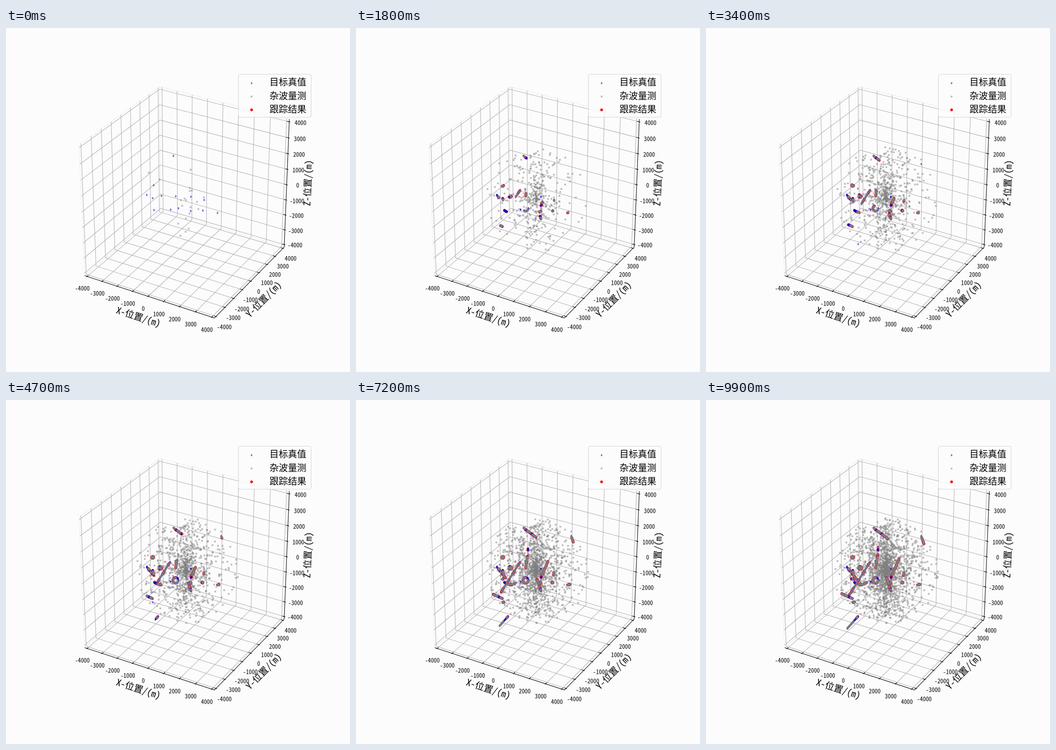
An HTML page with a canvas for the animation above (10 s loop, 748x748 px).

```html
<!DOCTYPE html>
<html lang="zh">
<head>
<meta charset="utf-8">
<style>
html, body { margin: 0; width: 100%; height: 100%; overflow: hidden; background: #fcfcfc; }
canvas { display: block; width: 748px; height: 748px; }
</style>
</head>
<body>
<canvas id="stage" width="748" height="748"></canvas>
<script>
const ctx = document.getElementById('stage').getContext('2d');
const STEPS = 100, STEP_MS = 100, LAST_MOVE = 83;
const CJK = '"Noto Sans Mono CJK SC", "Noto Sans CJK SC", "Noto Sans CJK", sans-serif';
const GREY = 'rgba(128,128,128,.5)', BLUE = 'rgba(20,10,215,.6)', RED = 'rgba(255,0,0,.6)';

// Perspective camera: elevation 30, azimuth -60, distance 10, unit cube
function project(x, y, z) {
  x /= 8000; y /= 8000; z /= 8000;
  const u = .8660 * x + .5 * y;
  const v = -.25 * x + .4330 * y + .8660 * z;
  const d = 10 - (.4330 * x - .75 * y + .5 * z);
  return [391.4 + 3128 * u / d, 370 - 3114 * v / d];
}

function makeRng(seed) {
  return () => {
    seed = (seed + 0x6D2B79F5) | 0;
    let t = Math.imul(seed ^ (seed >>> 15), 1 | seed);
    t = (t + Math.imul(t ^ (t >>> 7), 61 | t)) ^ t;
    return ((t ^ (t >>> 14)) >>> 0) / 4294967296;
  };
}
const rng = makeRng(41);

// Clutter: each scan adds points uniform in range, azimuth and elevation
function randomScan() {
  return Array.from({ length: 20 }, () => {
    const r = 3000 * rng(), az = 2 * Math.PI * rng(), el = Math.PI * (rng() - .5);
    return project(r * Math.cos(el) * Math.cos(az), r * Math.cos(el) * Math.sin(az), r * Math.sin(el));
  });
}
const clutter = Array.from({ length: STEPS }, randomScan);

// A target flying straight, with an optional downward sag
function fly(birth, x, y, dx, dy, sag = 0) {
  return k => {
    const f = (k - birth) / (LAST_MOVE - birth);
    return f < 0 || f > 1 ? null : [x + dx * f, y + dy * f + 4 * sag * f * (1 - f)];
  };
}
// A target circling in place; with no radius it is seen only briefly
function circle(birth, x, y, r = 0) {
  const end = r ? LAST_MOVE : birth + 1;
  return k => {
    const a = 2 * Math.PI * (k - birth) / 50;
    return k < birth || k > end ? null : [x + r * Math.cos(a), y + r * Math.sin(a)];
  };
}
const targets = [
  fly(0, 364, 278, 32, 24),
  fly(0, 306, 363, 23, 28),
  fly(0, 319, 370, 4, 20),
  fly(0, 322, 396, 27, 1, 5),
  fly(0, 369, 366, 4, -30),
  fly(0, 431, 374, -2, 7),
  fly(0, 460, 402, 6, -1),
  circle(0, 319, 342, 2),
  circle(0, 335, 365, 3),
  circle(0, 369, 392, 6),
  circle(0, 400, 398, 1.5),
  circle(0, 427, 397, 1),
  circle(0, 358, 395),
  circle(0, 402, 367),
  fly(1, 402, 415, -9, -29),
  fly(1, 402, 387, 18, -42),
  fly(1, 357, 352, -48, 76),
  fly(1, 319, 432, -24, -11),
  fly(34, 331, 470, -24, 27),
  fly(34, 468, 296, 6, 17),
  fly(47, 319, 440, 4, -1),
  fly(60, 374, 327, 0, -7),
  circle(60, 318, 388, 2)
];

// Each track loses its estimate or its detections for short stretches
const tracks = targets.map(at => {
  const list = [];
  let tracked = true, seen = true;
  for (let k = 0; k < STEPS; k++) {
    const p = at(k);
    if (!p) continue;
    const age = list.length;
    if (age % 10 === 0) {
      tracked = rng() < .8;
      seen = rng() < .75;
    }
    const shift = () => (rng() - .5) * 1.6;
    list.push({ k, x: p[0], y: p[1], red: tracked && age > 1, grey: seen && age > 1, gx: p[0] + shift(), gy: p[1] + shift() });
  }
  return list;
});

function square(x, y) {
  ctx.fillStyle = GREY;
  ctx.fillRect(x - 1.9, y - 1.9, 3.8, 3.8);
}
function diamond(x, y, w = 2.1, h = 3.1) {
  ctx.fillStyle = BLUE;
  ctx.beginPath();
  ctx.moveTo(x, y - h);
  ctx.lineTo(x + w, y);
  ctx.lineTo(x, y + h);
  ctx.lineTo(x - w, y);
  ctx.fill();
}
function dot(x, y, color) {
  ctx.fillStyle = color;
  ctx.beginPath();
  ctx.arc(x, y, 2.9, 0, 2 * Math.PI);
  ctx.fill();
}
function line(color, ...pts) {
  ctx.strokeStyle = color;
  ctx.lineWidth = 1.1;
  ctx.beginPath();
  pts.forEach(p => ctx.lineTo(...project(...p)));
  ctx.stroke();
}
function label(text, x, y, size, deg = 0, align = 'center') {
  ctx.save();
  ctx.translate(x, y);
  ctx.rotate(deg * Math.PI / 180);
  ctx.font = size + 'px ' + CJK;
  ctx.textAlign = align;
  ctx.fillStyle = '#000';
  ctx.fillText(text, 0, size * .37);
  ctx.restore();
}

function drawAxes() {
  const E = 4167, OUT = E + 67, IN = E - 133, L = E + 520;
  const grid = '#b0b0b0', faint = '#eeeeee', ink = '#000';
  line(faint, [-E, -E, -E], [-E, -E, E], [-E, E, E], [E, E, E]);
  line(faint, [-E, -E, -E], [-E, E, -E], [E, E, -E]);
  line(faint, [-E, E, -E], [-E, E, E]);
  for (let v = -4000; v <= 4000; v += 1000) {
    line(grid, [v, -E, -E], [v, E, -E], [v, E, E]);
    line(grid, [E, v, -E], [-E, v, -E], [-E, v, E]);
    line(grid, [-E, -E, v], [-E, E, v], [E, E, v]);
  }
  line(ink, [-E, -E, -E], [E, -E, -E], [E, E, -E], [E, E, E]);
  for (let v = -4000; v <= 4000; v += 1000) {
    line(ink, [v, -OUT, -E], [v, -IN, -E]);
    line(ink, [OUT, v, -E], [IN, v, -E]);
    line(ink, [OUT, E, v], [IN, E, v]);
    const [zx, zy] = project(L, L, v);
    label(String(v), ...project(v, -L, -L), 12.8);
    label(String(v), ...project(L, v, -L), 12.8);
    label(String(v), zx - 3, zy + 5.5, 12.8);
  }
  label('X-位置/(m)', 288, 628, 20, 17.8);
  label('Y-位置/(m)', 560, 590, 20, -45.5);
  label('Z-位置/(m)', 656, 337, 20, -87.7);
}

function drawLegend() {
  ctx.beginPath();
  ctx.roundRect(505.5, 100.5, 158, 93.5, 4);
  ctx.fillStyle = 'rgba(253,253,253,.85)';
  ctx.fill();
  ctx.strokeStyle = '#d4d4d4';
  ctx.lineWidth = 1.1;
  ctx.stroke();
  diamond(534, 120, 1.9, 3);
  square(534, 149);
  dot(534, 178, '#f00');
  ['目标真值', '杂波量测', '跟踪结果'].forEach((name, i) => label(name, 573, 118 + 29.5 * i, 20, 0, 'left'));
}

function draw(step) {
  ctx.fillStyle = '#fcfcfc';
  ctx.fillRect(0, 0, 748, 748);
  drawAxes();
  for (let k = 0; k <= step; k++) clutter[k].forEach(p => square(...p));
  for (const track of tracks) {
    const marks = track.filter(m => m.k <= step);
    marks.forEach(m => m.red && dot(m.x, m.y, RED));
    marks.forEach(m => diamond(m.x, m.y));
    marks.forEach(m => m.grey && square(m.gx, m.gy));
  }
  drawLegend();
}

let shown = -1;
function tick() {
  const step = Math.floor(performance.now() / STEP_MS) % STEPS;
  if (step !== shown) draw(shown = step);
  requestAnimationFrame(tick);
}
tick();
</script>
</body>
</html>
```
